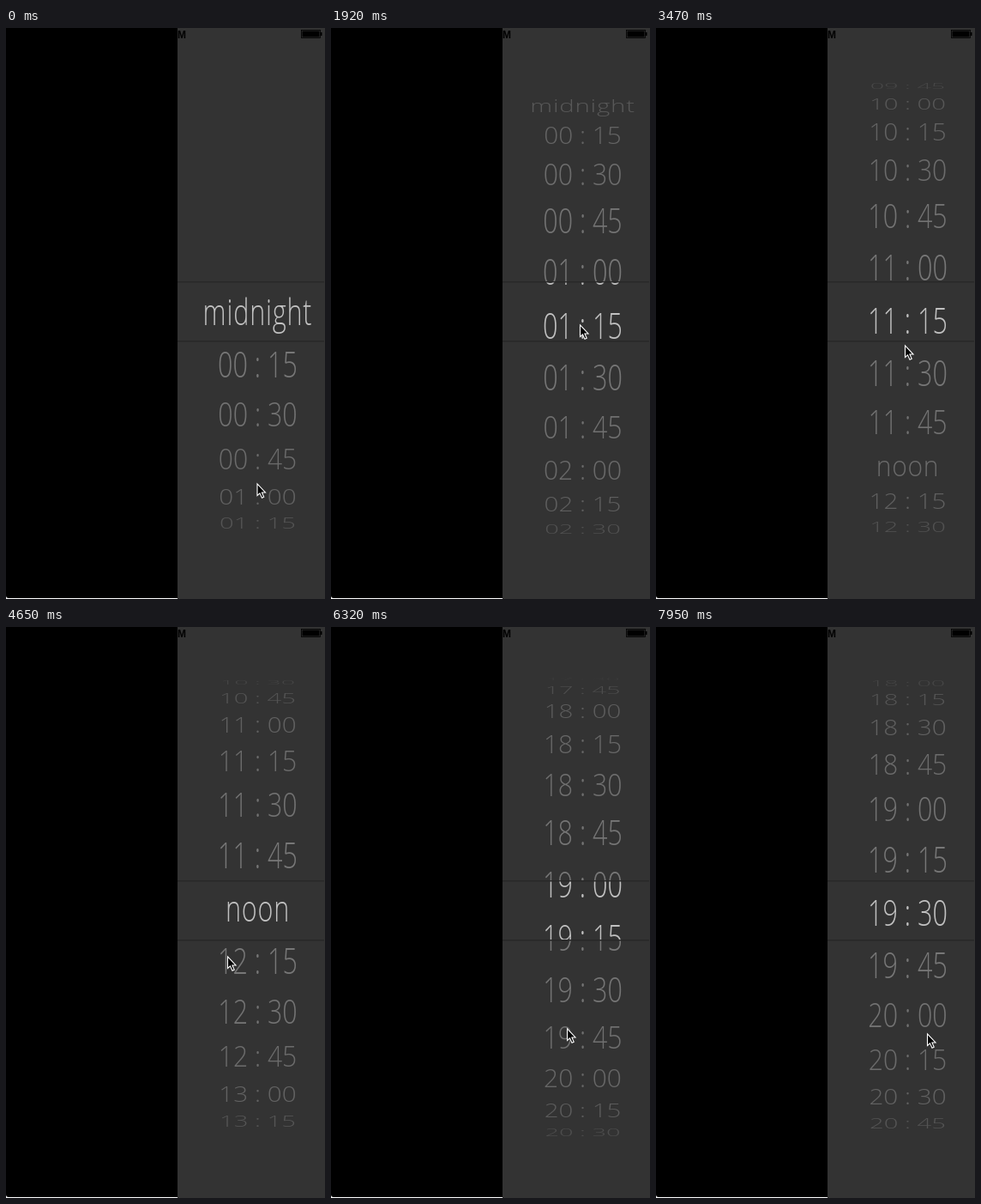
Write an HTML page with a canvas that moves like this. It is 372 by 665 pixels and loops after 8000 ms.

```html
<!DOCTYPE html>
<html lang="en">
<head>
<meta charset="utf-8">
<title>Time picker</title>
<style>
  html, body { margin: 0; width: 100%; height: 100%; overflow: hidden; background: #fff; }
  canvas { display: block; width: 372px; height: 665px; }
</style>
</head>
<body>
<canvas id="stage" width="372" height="665"></canvas>
<script>
const ctx = document.getElementById('stage').getContext('2d');
const LOOP = 8000, WIDTH = 372, HEIGHT = 665, PANEL_X = 200;
const CENTER_X = 293.5, CENTER_Y = 330.5, RADIUS = 270;
const ROW_ANGLE = 13.2 * Math.PI / 180;
const BAND_TOP = 296, BAND_BOTTOM = 365;
const FONT_SIZE = 30.6, STRETCH = 1.41, ROWS_PER_DAY = 96;

// Time in ms and wheel position in rows (a row is 15 minutes).
const wheelKeys = [
  [1350, 0], [1920, 4.735], [3300, 44.84], [3470, 44.84], [4170, 48.05],
  [4650, 48.05], [6320, 76.47], [7020, 105.25], [7950, 173.97]
];

// Time in ms and resting places of the pointer tip between swipes.
const pointerKeys = [
  [60, 292.5, 530], [320, 288, 539], [890, 288, 539], [1350, 289, 638],
  [1920, 290, 345], [3470, 290, 369], [4170, 258, 383], [4650, 258, 383],
  [6320, 275, 467], [7020, 286, 421], [7950, 316, 473]
];

function spanAt(keys, t) {
  let i = 0;
  while (i < keys.length - 2 && t >= keys[i + 1][0]) i++;
  const start = keys[i][0], length = keys[i + 1][0] - start;
  return { i, length, u: Math.min(1, Math.max(0, (t - start) / length)) };
}

// Cubic interpolation that never overshoots its keys.
function sample(keys, t, column = 1) {
  const slope = i => keys[i] && keys[i + 1]
    ? (keys[i + 1][column] - keys[i][column]) / (keys[i + 1][0] - keys[i][0]) : 0;
  const tangent = i => {
    const a = slope(i - 1), b = slope(i);
    return a * b > 0 ? 2 * a * b / (a + b) : 0;
  };
  const { i, length, u } = spanAt(keys, t);
  const from = keys[i][column], to = keys[i + 1][column];
  return from + (to - from) * u * u * (3 - 2 * u)
    + length * u * (1 - u) * (tangent(i) * (1 - u) - tangent(i + 1) * u);
}

// While the wheel is flung, the pointer swipes up and back about every 800 ms.
function swipe(t) {
  const { i, length, u } = spanAt(wheelKeys, t);
  const flung = wheelKeys[i + 1][1] - wheelKeys[i][1] > 20;
  return flung ? Math.sin(Math.PI * u * Math.round(length / 800)) ** 2 : 0;
}

function label(slot) {
  if (slot === 0) return 'midnight';
  if (slot === 48) return 'noon';
  const pad = n => String(n).padStart(2, '0');
  return pad(Math.floor(slot / 4)) + ' : ' + pad(slot % 4 * 15);
}

function rect(color, x, y, w, h) {
  ctx.fillStyle = color;
  ctx.fillRect(x, y, w, h);
}

function drawRows(position, strength) {
  ctx.font = `300 ${FONT_SIZE}px "Open Sans", "Noto Sans", sans-serif`;
  ctx.textAlign = 'center';
  const first = Math.max(0, Math.floor(position) - 7);
  for (let row = first; row < first + 15; row++) {
    const angle = (row - position) * ROW_ANGLE;
    if (angle < -1.53 || angle > 1.29) continue;
    const depth = Math.cos(angle), slot = row % ROWS_PER_DAY;
    ctx.save();
    ctx.translate(CENTER_X, CENTER_Y + RADIUS * Math.sin(angle));
    ctx.scale(1 - 0.075 * (1 - depth), STRETCH * depth);
    ctx.letterSpacing = slot % 48 ? '0px' : '0.8px';
    ctx.fillStyle = `rgba(255,255,255,${strength * depth ** 0.8})`;
    ctx.fillText(label(slot), 0, FONT_SIZE * 0.357);
    ctx.restore();
  }
}

function clipped(areas, draw) {
  ctx.save();
  ctx.beginPath();
  areas.forEach(([top, bottom]) => ctx.rect(PANEL_X, top, WIDTH - PANEL_X, bottom - top));
  ctx.clip();
  draw();
  ctx.restore();
}

function drawWheel(position) {
  clipped([[57, BAND_TOP], [BAND_BOTTOM, 603]], () => drawRows(position, 0.34));
  clipped([[BAND_TOP, BAND_BOTTOM]], () => drawRows(position, 0.7));
  for (const y of [BAND_TOP, BAND_BOTTOM]) rect('#282828', PANEL_X, y - 1, 171, 1.5);
}

function drawStatusBar() {
  ctx.font = 'bold 12px "Liberation Sans", sans-serif';
  ctx.textAlign = 'left';
  ctx.fillStyle = ctx.strokeStyle = '#000';
  ctx.fillText('M', PANEL_X, 11.5);
  ctx.lineWidth = 0.8;
  ctx.strokeRect(344.5, 2.5, 22, 9);
  ctx.fillRect(345.5, 3.5, 20, 7);
  ctx.fillRect(367, 5, 1.5, 4);
}

function drawPointer(x, y) {
  ctx.save();
  ctx.translate(x, y);
  const arrow = new Path2D('M.5 .8V14.5L3.5 11.8 6 17.2 8.2 16.2 5.9 11H10Z');
  ctx.fillStyle = '#000';
  ctx.fill(arrow);
  ctx.strokeStyle = '#fff';
  ctx.lineWidth = 1.1;
  ctx.stroke(arrow);
  ctx.restore();
}

function frame() {
  const t = performance.now() % LOOP;
  rect('#fff', 0, 0, WIDTH, HEIGHT);
  ctx.fillStyle = '#000';
  ctx.beginPath();
  ctx.roundRect(0, 0, PANEL_X, HEIGHT - 1, [0, 0, 0, 3]);
  ctx.fill();
  rect('#333', PANEL_X, 0, WIDTH - PANEL_X, HEIGHT);
  drawStatusBar();
  drawWheel(sample(wheelKeys, t));
  drawPointer(sample(pointerKeys, t, 1), sample(pointerKeys, t, 2) * (1 - 0.85 * swipe(t)));
  requestAnimationFrame(frame);
}
frame();
</script>
</body>
</html>
```
